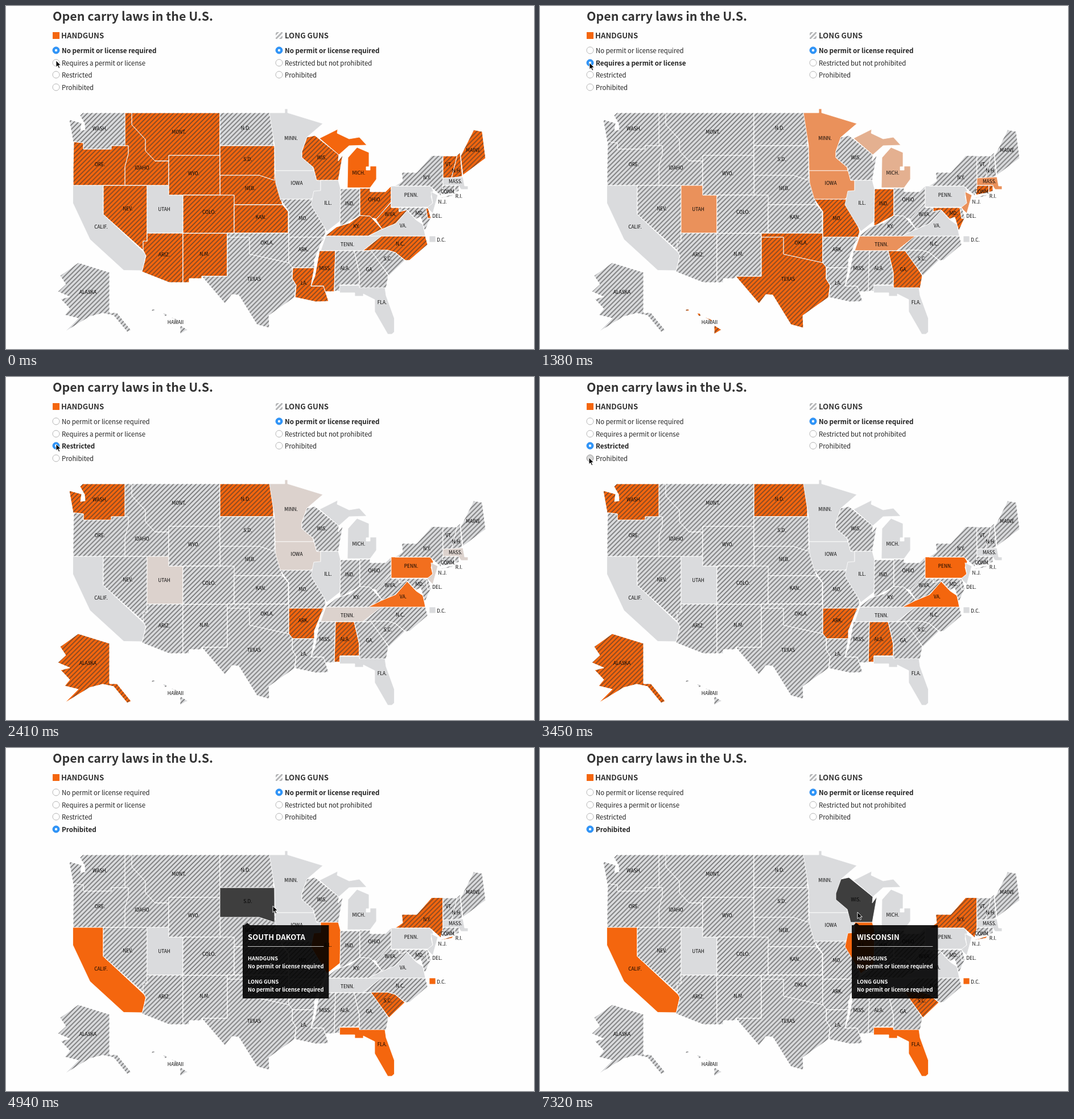
Recreate the animation shown at these times as an HTML page. Size 928 by 604 pixels, loop 8 s.

```html
<!DOCTYPE html>
<html lang="en">
<head>
<meta charset="utf-8">
<title>Open carry laws in the U.S.</title>
<style>
html, body { margin: 0; width: 100%; height: 100%; overflow: hidden; background: #fefefe; }
svg { display: block; width: 928px; height: 604px; font-family: "Noto Sans CJK JP", "Noto Sans CJK SC", "Noto Sans CJK", "Open Sans", sans-serif; fill: #222; }
.title { font-size: 21.4px; font-weight: 700; fill: #333; }
.head { font-size: 13.2px; font-weight: 700; fill: #333; }
.opt { font-size: 11.4px; }
.on { font-size: 11.6px; font-weight: 700; }
.tag { font-size: 8.3px; text-anchor: middle; fill: #000; }
.tip { font-size: 9.3px; font-weight: 700; fill: #fff; }
.name { font-size: 13.1px; }
.edge { stroke: #fff; stroke-width: .8; stroke-linejoin: round; }
</style>
</head>
<body>
<svg id="stage" viewBox="0 0 928 604">
  <defs>
    <pattern id="hatch" width="7.96" height="7.96" viewBox="0 0 8 8" patternUnits="userSpaceOnUse" patternTransform="translate(5.6 0)">
      <path d="M-2 2l4-4M0 8l8-8M6 10l4-4" stroke="#333" stroke-opacity=".62" stroke-width="1.7"/>
    </pattern>
    <clipPath id="chip"><path d="M474 46h12v12h-12z"/></clipPath>
  </defs>
  <text class="title" x="82" y="26">Open carry laws in the U.S.</text>
  <rect x="82" y="46" width="12" height="12" fill="#f4660e"/>
  <path clip-path="url(#chip)" d="M470 54l12-12M472 60l16-16M478 62l12-12" stroke="#b5b6b8" stroke-width="3"/>
  <text class="head" x="97" y="57">HANDGUNS</text>
  <text class="head" x="490" y="57">LONG GUNS</text>
  <g id="form"></g>
  <g id="map"></g>
  <g id="tags"></g>
  <g id="tip">
    <path id="box" fill="#000" fill-opacity=".9"/>
    <path id="rule" stroke="#fff" stroke-opacity=".75"/>
    <text class="tip name" x="9" y="26"></text>
    <text class="tip" x="9" y="62">HANDGUNS</text>
    <text class="tip" x="9" y="76"></text>
    <text class="tip" x="9" y="103">LONG GUNS</text>
    <text class="tip" x="9" y="117"></text>
  </g>
  <path id="cursor" d="M0 0v11.6l2.7-2.5 2 4.5 2-.9-2-4.3h3.6z" fill="#000" stroke="#fff" stroke-width=".9"/>
</svg>
<script>
const LOOP = 8000, STEP = 146, FADE = 800;
const GRAY = [218, 219, 221], ORANGE = [244, 102, 14], DARK = '#3e3e3e';
const HAND = ['No permit or license required', 'Requires a permit or license', 'Restricted', 'Prohibited'];
const LONG = [HAND[0], 'Restricted but not prohibited', HAND[3]];
const $ = id => document.getElementById(id);
const clamp = (v, lo, hi) => Math.min(hi, Math.max(lo, v));

function add(parent, tag, attrs, text) {
  const el = document.createElementNS('http://www.w3.org/2000/svg', tag);
  for (const k in attrs) el.setAttribute(k, attrs[k]);
  if (text) el.textContent = text;
  return parent.appendChild(el);
}

function radio(x, row, label) {
  const y = Math.round(78.2 + 21.5 * row);
  const ring = add($('form'), 'circle', { cx: x, cy: y, r: 6 });
  const dot = add($('form'), 'circle', { cx: x, cy: y, r: 2.2, fill: '#fff' });
  const text = add($('form'), 'text', { x: x + 10, y: y + 4.5 }, label);
  return (on, pressed) => {
    ring.setAttribute('fill', on ? '#2f95f8' : pressed ? '#d6d6d6' : '#fff');
    ring.setAttribute('stroke', on ? '#2f8df0' : pressed ? '#999' : '#b4b4b4');
    dot.setAttribute('visibility', on ? 'visible' : 'hidden');
    text.setAttribute('class', on ? 'on' : 'opt');
  };
}
const radios = HAND.map((s, i) => radio(88, i, s));
LONG.forEach((s, i) => radio(480, i, s)(i === 0, false));

// Label, its centre, handgun group, outline. Later states cover the rough edges of earlier ones.
const states = {};
function state(label, x, y, group, outline, hatched) {
  const d = `M${outline}z`;
  const base = add($('map'), 'path', { d, class: 'edge' });
  const lines = hatched && add($('map'), 'path', { d, class: 'edge', fill: 'url(#hatch)' });
  add($('tags'), 'text', { class: 'tag', x, y: y + 3 }, label);
  states[label] = { base, lines, group };
}
const striped = (...a) => state(...a, true);
const plain = (...a) => state(...a, false);

striped('MONT.', 304, 222, 0, '215,188H376V273H215');
striped('IDAHO', 239, 285, 0, '205,188H221V209L245,235V255L262,273H286V316H205');
striped('WASH.', 165, 216, 2, '135,188H209V256H121L111,200 133,206 131,219 139,218 138,207 130,193');
striped('ORE.', 165, 279, 0, '119,239L136,241V252H185V246H215V260L209,283V316H118V284');
plain('CALIF.', 167, 389, 3, '117.5,316H171V367L246,437 240,466 207,465.5 147.5,411 117.5,347');
striped('NEV.', 214, 357, 0, '171,316H248V430H241L171,367');
plain('UTAH', 278, 358, 1, '248,316H311V400H248');
striped('ARIZ.', 278, 438, 0, '248,400H311V487H287L239,468 246,440 241,430V414H248');
striped('N.M.', 349, 437, 0, '311,400H389V476H344V480H322V487H311');
striped('NEB.', 429, 321, 0, '376,290H472L486,350H376');
striped('WYO.', 330, 295, 0, '286,263H376V333H286');
striped('COLO.', 357, 363, 0, '311,333H401V400H311');
striped('N.D.', 421, 215, 2, '376,188H470V246H376');
striped('S.D.', 425, 270, 0, '376,246H472V307L445,298H376');
striped('KAN.', 448, 372, 0, '401,350H486L496,362V400H401');
striped('TEXAS', 436, 481, 1, '389,400H503V480L510,492 507,513 462,545 463,567 441,561 409,509 397,508 385,524 344,476H389');
striped('OKLA.', 459, 417, 1, '389,400H497V452L428,437V407H389');
plain('MINN.', 501, 233, 1, '463,188H490V181H495V188L557,207 529,231 541,290H473L472,246');
striped('MO.', 522, 374, 1, '482,340H545L562,397 557,414H497V362');
plain('IOWA', 511, 312, 1, '473,290H541L553,308V325L536,340H482L474,312');
striped('ARK.', 523, 429, 2, '497,407H558L542,447V461H504L497,452');
striped('LA.', 524, 488, 0, '504,461H542L536,493H558L567,520 545,521 508,513 510,492 503,480');
striped('WIS.', 555, 267, 0, '529,231L543,228 585,262 584,273 592,262 584,307H546L540,284 520,267V256');
plain('MICH.', 620, 294, 0, '551,233L583,217 582,224 603,234 621,231 634,245 603,246 585,262zM600,320L601,267 617,249 638,258V283H633V289H640V282H651V305L640,320');
plain('ILL.', 566, 347, 3, '553,307H584L588,322V378L564,397 536,350 541,326 553,325');
striped('IND.', 604, 348, 1, '588,322H622V369L587,388');
striped('OHIO', 647, 341, 0, '622,321H640V327H667L677,317V345L651,375 622,369');
plain('TENN.', 600, 420, 1, '553,431L562,405H660L627,431');
striped('KY.', 616, 388, 0, '561,405L581,389 604,382 622,369 640,370 661,393 637,405');
striped('MISS.', 561, 462, 0, '551,431H579L577,503H561L558,493H536L543,475');
striped('ALA.', 596, 462, 2, '579,431H612L621,470V491H587V502H577');
striped('GA.', 639, 464, 1, '612,431H644L672,475 668,497H621V470');
plain('FLA.', 661, 522, 3, '586.5,492H621V496H666L668,510 682.5,550V574L678,578H671L648,538V517L628,507V511H613V505H586.5');
striped('N.C.', 693, 419, 0, '627,431L660,405H737L741,420 709,448H702L684,434 650,430');
striped('S.C.', 671, 445, 3, '641,430H671L684,434 701,448 673,475');
plain('VA.', 698, 387, 2, '637,405L661,393 705,360 721,377 733,385 737,405');
striped('W.VA.', 676, 367, 0, '650,376L677,346V355H691V362L714,356 705,360 685,383 661,393');
plain('PENN.', 712, 333, 2, '677,317H746L751,325 747,335 750,347 742,354H677');
striped('N.Y.', 740, 302, 3, '695.5,293H722L748,263.5H768V318L764,334 745,317H684L697,308zM760,339L786,331 784,335');
striped('VT.', 778, 279, 0, '768,264H793L783,303H768');
striped('N.H.', 792, 290, 0, '793,263L798,258 802,300 783,303');
striped('MAINE', 821, 254, 0, '799,264L822,218 837,221 843,268 803,298');
plain('MASS.', 790, 309, 1, '768,303L803,301 806,317H812V323H800L795,316H768');
striped('CONN.', 777, 327, 1, '768,316H789V328L766,333');
striped('R.I.', 796, 335, 1, '789,316H796V326L789,328');
plain('N.J.', 767, 345, 1, '747,327L759,333 750,365 740,355 750,347');
striped('MD.', 727, 365, 1, '691,355H738L746,374 736,396 729,372 720,375 705,359 691,362');
striped('DEL.', 758, 370, 0, '738,356H742L747,374H741');
plain('D.C.', 765, 412, 3, '744,405h11v11h-11');
striped('ALASKA', 144, 504, 2, '127,452L182,469V540H195L220,571 213,574 189,545 170,541 147,547 103,574 127,550 103,544 112,533 96,516 112,512 91,503 105,490 95,475');
striped('HAWAII', 298, 557, 1, '256,534h6v3h-6zM276,541h5l2,5h-4zM288,547l13,5 3,5zM306,562l13,8-13,8');

// Times of the choices, cursor stops and hovered states
const picks = [-FADE, 800, 1820, 3750], press = 3450;
const stops = [
  [500, 87, 100], [1820, 88, 118], [2560, 86, 142], [3750, 89, 141], [4790, 460, 274],
  [4940, 469, 278], [5830, 487, 281], [6870, 524, 285], [7320, 558, 289]
];
const hovers = [
  { at: 4790, key: 'S.D.', name: 'SOUTH DAKOTA', hand: HAND[0], long: LONG[0] },
  { at: 5680, key: 'MINN.', name: 'MINNESOTA', hand: HAND[1], long: LONG[2] },
  { at: 7170, key: 'WIS.', name: 'WISCONSIN', hand: HAND[0], long: LONG[0] }
];
const ease = u => u < .5 ? 4 * u ** 3 : 1 - 4 * (1 - u) ** 3;
const mix = p => `rgb(${GRAY.map((c, i) => Math.round(c + (ORANGE[i] - c) * p))})`;
const tipText = $('tip').querySelectorAll('text');

function showTip(hover) {
  $('tip').setAttribute('visibility', hover ? 'visible' : 'hidden');
  if (!hover) return;
  [hover.name, 'HANDGUNS', hover.hand, 'LONG GUNS', hover.long].forEach((s, i) => { tipText[i].textContent = s; });
  const wide = Math.max(...[...tipText].map(el => el.getComputedTextLength()));
  const b = states[hover.key].base.getBBox();
  $('tip').setAttribute('transform', `translate(${b.x + b.width / 2 - 8} ${b.y + b.height + 5})`);
  $('box').setAttribute('d', `M0 0h3l5-4 5 4H${wide + 18}v129H0z`);
  $('rule').setAttribute('d', `M9 37.5h${wide}`);
}

// Each move takes two steps and ends at its stop.
function cursorAt(t) {
  return stops.reduce(([x, y], [at, sx, sy]) => {
    const f = clamp(Math.floor((t - at) / STEP) + 2, 0, 2) / 2;
    return [x + (sx - x) * f, y + (sy - y) * f];
  }, [88, 96]);
}

function draw(t) {
  const pick = picks.filter(s => s <= t).length - 1;
  const held = Math.floor((t - picks[pick]) / STEP) * STEP;
  const p = pick ? ease(clamp(held / FADE, 0, 1)) : 1;
  const hover = hovers.filter(h => h.at <= t).pop();

  radios.forEach((set, i) => set(i === pick, i === 3 && t >= press));
  for (const id in states) {
    const { base, lines, group } = states[id];
    const lit = hover && hover.key === id;
    const now = lines ? 1 : p;
    const level = group === pick ? now : group === pick - 1 ? 1 - now : 0;
    base.setAttribute('fill', lit ? DARK : mix(level));
    if (lines) lines.setAttribute('visibility', lit ? 'hidden' : 'visible');
  }
  showTip(hover);
  $('cursor').setAttribute('transform', `translate(${cursorAt(t)})`);
}

const start = performance.now();
function tick(now) {
  draw(Math.max(0, now - start) % LOOP);
  requestAnimationFrame(tick);
}
draw(0);
requestAnimationFrame(tick);
</script>
</body>
</html>
```
